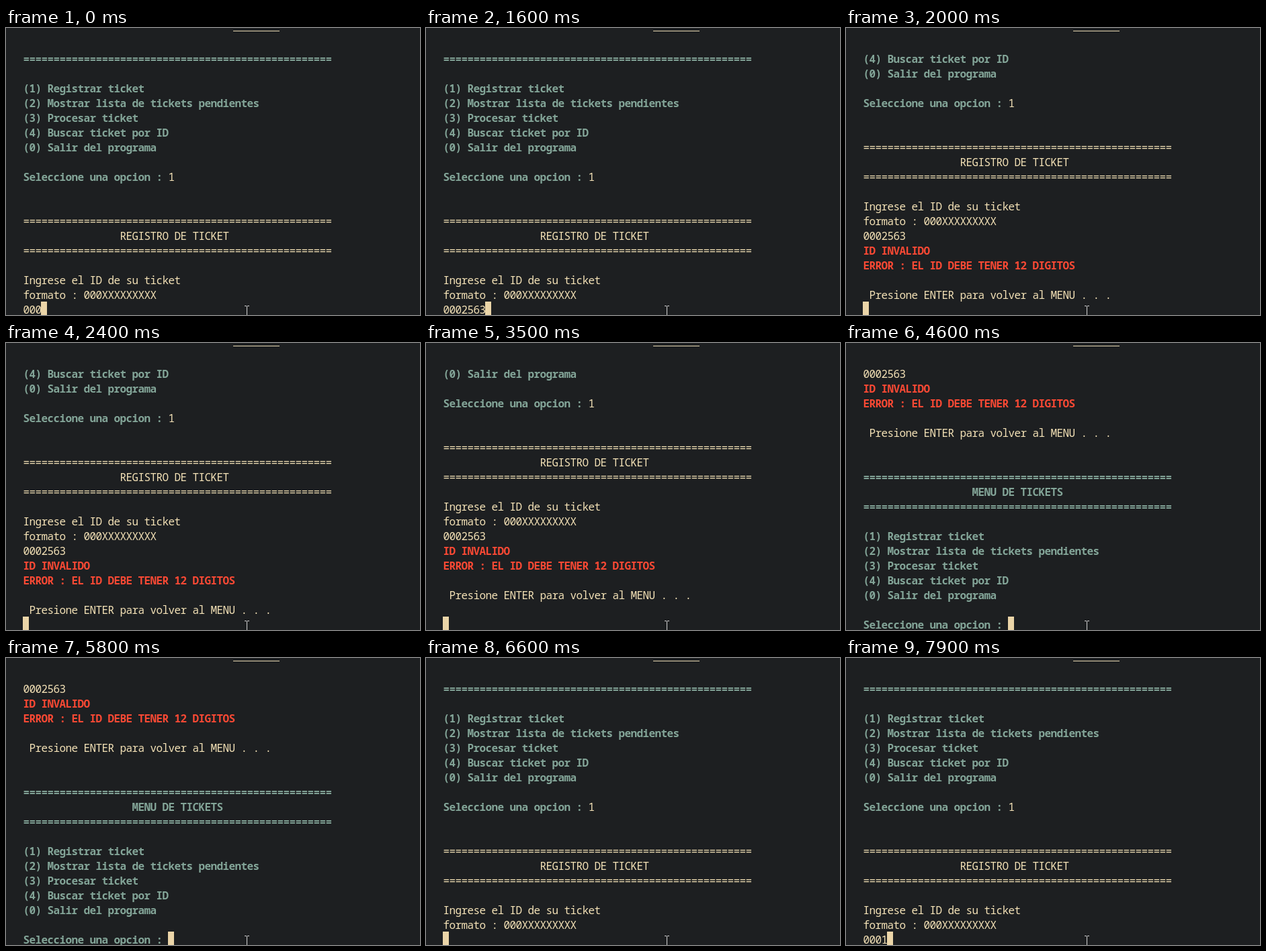
Write an HTML page that moves like this. It is 616 px wide and 428 px high and loops after 8 s.

```html
<!DOCTYPE html>
<html lang="es">
<head>
<meta charset="utf-8">
<title>Menu de tickets</title>
<style>
  html, body { margin: 0; width: 100%; height: 100%; overflow: hidden; background: #1d1f21; }
  svg { display: block; }
  text {
    font: 16px "Noto Sans Mono", "DejaVu Sans Mono", monospace;
    letter-spacing: -0.6px;
    white-space: pre;
    font-variant-ligatures: none;
  }
  .cream { fill: #f3e1b6; font-weight: 500; }
  .teal { fill: #83a598; font-weight: 700; }
  .red { fill: #fb4934; font-weight: 700; }
</style>
</head>
<body>
<svg width="616" height="428" viewBox="0 0 616 428">
  <rect x="338" y="4" width="69" height="1" fill="#e8d9b2"/>
  <g id="rows"></g>
  <rect id="cursor" width="9" height="22" fill="#ebd5a8"/>
  <path d="M355 414.5h3M359 414.5h3M358.5 415v13" fill="none" stroke="#d2d2d2"/>
</svg>
<script>
const LOOP = 8000, ROWS = 18, LEFT = 25, TOP = 34, CELL = 9, LINE = 22;
const INSET = 0.4, BASE = 18;
const RULE = '='.repeat(51);

const cream = text => ['cream', text];
const teal = text => ['teal', text];
const red = text => ['red', text];

const options = teal([
  '', '(1) Registrar ticket', '(2) Mostrar lista de tickets pendientes',
  '(3) Procesar ticket', '(4) Buscar ticket por ID', '(0) Salir del programa',
  '', 'Seleccione una opcion : '
].join('\n'));
const register = cream([
  '\n\n', RULE, ' '.repeat(16) + 'REGISTRO DE TICKET', RULE,
  '', 'Ingrese el ID de su ticket', 'formato : 000XXXXXXXXX', ''
].join('\n'));

// Terminal output: time, then the pieces appended at that time
const steps = [
  [0, teal(RULE + '\n'), options, cream('1'), register, cream('000')],
  [400, cream('2')],
  [700, cream('5')],
  [1000, cream('6')],
  [1300, cream('3')],
  [2000, red('\nID INVALIDO\nERROR : EL ID DEBE TENER 12 DIGITOS\n'),
    cream('\n Presione ENTER para volver al MENU . . .\n')],
  [3200, cream('\n')],
  [4000, teal('\n' + RULE + '\n' + ' '.repeat(18) + 'MENU DE TICKETS\n' + RULE + '\n'), options],
  [5900, cream('1')],
  [6500, register],
  [7100, cream('0')],
  [7300, cream('0')],
  [7500, cream('0')],
  [7800, cream('1')]
];

const svgNode = (name, parent) =>
  parent.appendChild(document.createElementNS('http://www.w3.org/2000/svg', name));
const cursor = document.getElementById('cursor');
const rows = Array.from({ length: ROWS }, (_, i) => {
  const row = svgNode('text', document.getElementById('rows'));
  row.setAttribute('y', TOP + BASE + i * LINE);
  return row;
});

function layout(count) {
  const lines = [[]];
  for (const [, ...pieces] of steps.slice(0, count))
    for (const [style, text] of pieces)
      text.split('\n').forEach((part, i) => {
        if (i) lines.push([]);
        if (part) lines[lines.length - 1].push([style, part]);
      });
  return lines.slice(-ROWS);
}

function draw(count) {
  const lines = layout(count);
  rows.forEach((row, i) => {
    row.textContent = '';
    let column = 0;
    for (const [style, text] of lines[i] || []) {
      const span = svgNode('tspan', row);
      span.setAttribute('class', style);
      span.setAttribute('x', LEFT + INSET + column * CELL);
      span.textContent = text;
      column += text.length;
    }
    if (i === lines.length - 1) {
      cursor.setAttribute('x', LEFT + column * CELL);
      cursor.setAttribute('y', TOP + i * LINE);
    }
  });
}

let shown = 0;
const start = performance.now();
function tick() {
  const time = (performance.now() - start) % LOOP;
  const count = steps.filter(([at]) => at <= time).length;
  if (count !== shown) draw(shown = count);
  requestAnimationFrame(tick);
}
tick();
</script>
</body>
</html>
```
